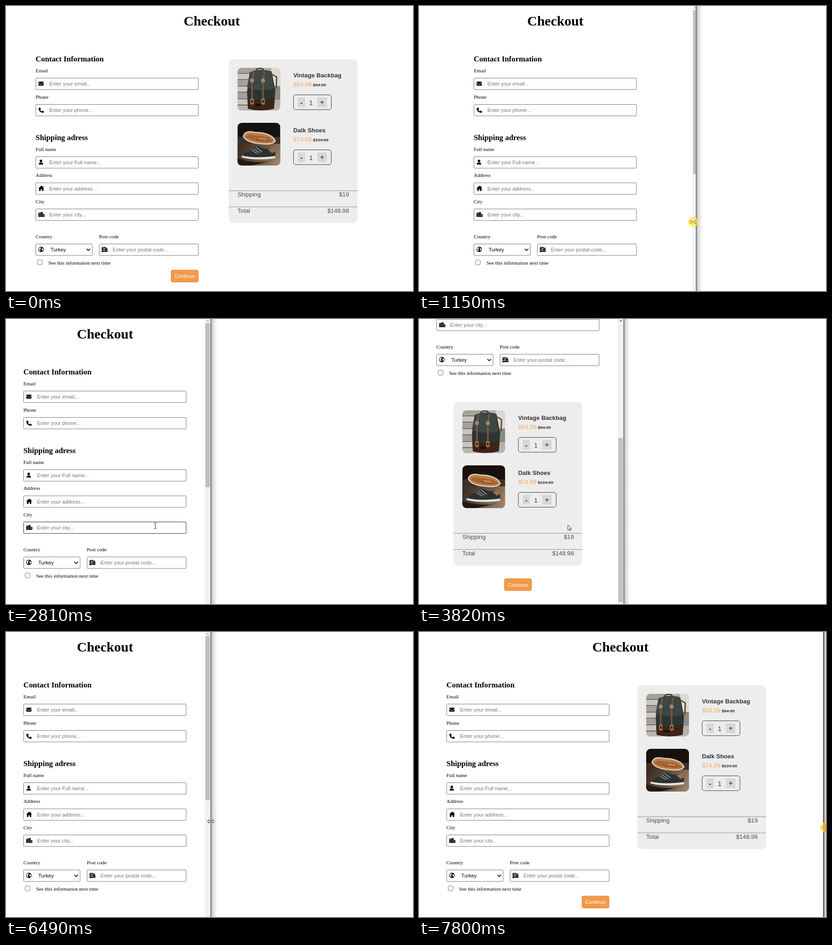
Recreate the animation shown at these times as an HTML page with a canvas. Size 894 px wide and 627 px high, loop 8 s.

```html
<!DOCTYPE html>
<html lang="en">
<head>
<meta charset="utf-8">
<title>Checkout</title>
<style>
html, body { margin: 0; width: 100%; height: 100%; overflow: hidden; background: #fff; }
canvas { display: block; }
</style>
</head>
<body>
<canvas id="stage" width="894" height="627"></canvas>
<script>
const c = document.getElementById('stage').getContext('2d');
const LOOP = 8000, W = 894, H = 627, FORM = 358, CARD = 282.5, MAX_SCROLL = 446;
const SERIF = '"Liberation Serif", "Times New Roman", serif';
const SANS = '"Liberation Sans", Arial, sans-serif';

// time, window edge, page width
const sizes = [
  [0, 920, 904], [500, 844, 840], [820, 733, 720], [1150, 609, 599], [1480, 517, 506],
  [1810, 498, 482], [2160, 465, 444], [2480, 450, 435], [6820, 651, 637],
  [7140, 790, 768], [7470, 855, 840], [7800, 889, 885]
];
// time, scroll offset
const scrolls = [[0, 0], [3150, 111], [3490, 334], [3820, 446], [4480, 425], [4820, 223], [5170, 45], [5500, 0]];
// time, kind, x, y
const pointers = [
  [0, 'none', 0, 0], [500, 'drag', 842, 472], [820, 'drag', 728, 474], [1150, 'drag', 602, 475],
  [1480, 'drag', 512, 478], [1810, 'drag', 493, 481], [2160, 'drag', 460, 484], [2480, 'drag', 452, 486],
  [2810, 'text', 328, 455], [3150, 'arrow', 326.5, 452.5], [4150, 'arrow', 328.5, 452.5],
  [5500, 'arrow', 349.5, 442], [5830, 'arrow', 446, 417], [6160, 'arrow', 449.5, 417],
  [6490, 'resize', 450, 416.5], [6820, 'drag', 651, 420], [7140, 'drag', 790, 425],
  [7470, 'drag', 855, 428], [7800, 'drag', 892, 430]
];
const at = (list, t) => list.findLast(k => k[0] <= t);

function text(s, x, y, size, color = '#000', font = SANS, weight = '', align = 'left') {
  c.font = `${weight} ${size}px ${font}`;
  c.textAlign = align;
  c.fillStyle = color;
  c.fillText(s, x, y);
}
function rect(x, y, w, h, fill) {
  c.fillStyle = fill;
  c.fillRect(x, y, w, h);
}
function round(x, y, w, h, r, fill, stroke, line = 1) {
  c.beginPath();
  c.roundRect(x, y, w, h, r);
  if (fill) { c.fillStyle = fill; c.fill(); }
  if (stroke) { c.strokeStyle = stroke; c.lineWidth = line; c.stroke(); }
}
function path(d, fill, stroke, line = 1) {
  const p = new Path2D(d);
  if (fill) { c.fillStyle = fill; c.fill(p); }
  if (stroke) { c.strokeStyle = stroke; c.lineWidth = line; c.stroke(p); }
}
function disc(x, y, r, fill) {
  c.beginPath();
  c.arc(x, y, r, 0, 7);
  c.fillStyle = fill;
  c.fill();
}
function place(x, y, draw) {
  c.save();
  c.translate(x, y);
  draw();
  c.restore();
}

const icons = {
  mail() {
    round(-5.7, -4.3, 11.4, 8.7, 1.4, '#000');
    path('M-6 -2L-.9 1.5Q0 2 .9 1.5L6 -2', null, '#fff', 1);
  },
  phone() {
    path('M-5 -4.6L-2.6 -5.3Q-2 -5.4 -1.7 -4.8L-.6 -2.3Q-.4 -1.8 -.8 -1.4L-2 -.4Q-.8 2 1.4 3' +
      'L2.5 1.6Q2.9 1.2 3.4 1.4L5.8 2.4Q6.4 2.7 6.2 3.3L5.6 5.6Q5.4 6.1 4.8 6.1Q-5.5 5.3 -5.6 -4Q-5.5 -4.5 -5 -4.6Z', '#000');
  },
  user() {
    disc(-.3, -2.9, 2.8, '#000');
    path('M-5.2 5Q-5.2 .8 -1.4 .8H.8Q4.6 .8 4.6 5Z', '#000');
  },
  house() {
    path('M.5 -6L7 0H5.2V5.6H2V2H-1V5.6H-4.2V0H-6L.5 -6ZM3 -5H4.8V-2H3Z', '#000');
  },
  city() {
    path('M-6 -3H-4.5V-5H-3.4V-3H-2V-5H-.8V-3H-.2V-5.4H4V-1H7.7V5H-6Z', '#000');
    for (let i = 0; i < 5; i++) rect(-4.8 + i * 2.5, i > 3 ? .6 : -1.8, 1.1, 1.3, '#fff');
    for (let i = 0; i < 5; i++) rect(-4.8 + i * 2.5, 1.4, 1.1, 1.4, '#fff');
  },
  globe() {
    disc(0, -.4, 5.8, '#000');
    path('M-4.5 -2.4Q-3 -5 -.8 -4.8L.2 -3.4L-1.4 -1.6L-2.8 -.6L-1 1L-1.6 3.8Q-3.4 2.6 -4.6 .4Z' +
      'M2.6 -3.6L4.6 -1.4L4.4 1.4L2.8 2.8L1.2 .4L1.6 -1.6Z', '#fff');
  },
  bulk() {
    path('M-6 -5.5H2.4V-2.6H-1.5V1H-6Z', '#000');
    path('M-5 -3.5H0', null, '#fff', .9);
    rect(-6.3, 2, 5.5, 3.4, '#000');
    round(-.3, -1.7, 7.2, 6.6, .8, '#000');
    path('M-.3 .4L3.3 2.5L7 .4', null, '#fff', .9);
    rect(3, -4.2, 3, 2, '#000');
  }
};

function field(x, y, w, icon, hint, border = '#767676') {
  round(x + .5, y + .5, w - 1, 25.3, 1.8, '#fff', border);
  place(x + 12, y + 12.8, icons[icon]);
  text(hint, x + 30, y + 17.2, 11.28, '#757575');
}
const label = (s, x, y) => text(s, x, y, 11.28, '#000', SERIF);
const heading = (s, x, y) => text(s, x, y, 16.9, '#000', SERIF, 'bold');

function drawForm(x, hover) {
  heading('Contact Information', x, 122);
  label('Email', x, 146);
  field(x, 158, FORM, 'mail', 'Enter your email...');
  label('Phone', x, 203.5);
  field(x, 216, FORM, 'phone', 'Enter your phone...');
  heading('Shipping adress', x, 294.5);
  label('Full name', x, 318.5);
  field(x, 331, FORM, 'user', 'Enter your Full name...');
  label('Address', x, 376);
  field(x, 388.5, FORM, 'house', 'Enter your address...');
  label('City', x, 434);
  field(x, 446, FORM, 'city', 'Enter your city...', hover ? '#2c2c2c' : undefined);
  label('Country', x, 510.5);
  field(x, 523, 125, 'globe', '');
  text('Turkey', x + 32.7, 540, 11.28);
  path(`M${x + 112} 534L${x + 116} 538L${x + 120} 534`, null, '#000', 1.7);
  label('Post code', x + 139.3, 510.5);
  field(x + 139.3, 523, FORM - 139.3, 'bulk', 'Enter your postal code...');
  round(x + 4, 558.8, 10.5, 10.5, 2, '#fff', '#767676');
  label('See this information next time', x + 28, 568.5);
}

function bagPhoto() {
  rect(0, 0, 94, 94, '#b5b0a9');
  for (let i = 0; i < 7; i++) {
    rect(0, i * 14, 40, 10, i % 2 ? '#c9c6c1' : '#a5a099');
    rect(0, i * 14 + 11, 40, 2, '#756f69');
  }
  rect(74, 0, 20, 44, '#d9d8d4');
  rect(78, 40, 16, 30, '#8a8983');
  rect(0, 84, 94, 10, '#b9b6b0');
  path('M40 8Q40 1 50 1Q58 1 58 9', null, '#46301f', 2.5);
  path('M27 10Q50 0 75 8L83 50L80 90Q50 97 23 90L21 52Z', '#2b3434');
  path('M27 10Q50 1 74 8L79 46Q52 54 21 43Z', '#3c4746');
  path('M22 68Q50 74 82 67L80 90Q50 97 23 90Z', '#3e2417');
  path('M36 9L32 28V82M59 9L56 28V82', null, '#815536', 3.4);
  path('M75 14L86 20L85 46', null, '#6f4328', 3);
  for (const x of [32, 56]) {
    disc(x, 28, 4.5, '#a18870');
    rect(x - 4, 68, 8, 12, '#9a7656');
    rect(x - 2, 71, 4, 6, '#3e2417');
  }
  rect(39, 79, 13, 6, '#20130d');
}

function shoePhoto() {
  rect(0, 0, 94, 94, '#17110d');
  const g = c.createLinearGradient(0, 44, 94, 94);
  g.addColorStop(0, '#352920');
  g.addColorStop(.55, '#685545');
  g.addColorStop(1, '#a68b6c');
  rect(0, 46, 94, 48, g);
  rect(0, 31, 94, 15, '#3e3028');
  path('M0 78Q40 92 78 83L30 94H0Z', '#211914');
  path('M13 30Q16 16 38 21Q76 22 83 40Q77 49 52 46Q20 44 13 30Z', '#bd7e48', '#e0d2c0', 2.5);
  path('M18 31Q24 23 40 28L70 34Q79 38 76 42Q40 44 18 31Z', '#a46434');
  path('M46 30L67 33L64 40L43 37Z', '#bd7e48', '#7d4926', 1.4);
  path('M10 72Q18 61 34 61L44 51L58 57L80 56Q85 65 82 76Q40 82 10 72Z', '#293134');
  path('M66 58L80 55L83 62L76 67Z', '#a96a3c');
  path('M10 72Q38 79 83 73V78Q38 84 9 76Z', '#e6e1d9');
  path('M32 61L44 68M36 58L49 66M41 54L54 64', null, '#c9c6c0', 1.1);
}

function photo(x, y, draw) {
  place(x, y, () => {
    c.beginPath();
    c.roundRect(0, 0, 94, 94, 9.5);
    c.clip();
    draw();
  });
}

function item(x, y, draw, name, price, old) {
  photo(x + 19, y + 19, draw);
  const l = x + 141.5;
  text(name, l, y + 40, 13.16, '#333', SANS, 'bold');
  text(price, l, y + 60.3, 13.16, '#f6a85f');
  text(old, l + 43.3, y + 60, 9.4, '#333');
  rect(l + 43.3, y + 56.2, c.measureText(old).width, 1, '#333');
  round(l + .5, y + 78.5, 83, 32.5, 4.5, null, '#333');
  rect(l + 10, y + 84, 16, 21.5, '#d8d8d8');
  rect(l + 53, y + 84, 20.5, 21.5, '#d8d8d8');
  text('-', l + 18, y + 100.5, 15, '#222', SANS, 'bold', 'center');
  text('1', l + 39, y + 101, 15, '#444', SANS, '', 'center');
  text('+', l + 63.2, y + 100, 16, '#222', SANS, '', 'center');
}

function sumRow(x, y, name, value) {
  rect(x, y, CARD, 1, '#8a8a8a');
  text(name, x + 19, y + 13, 13.16, '#4c4c4c');
  text(value, x + CARD - 18.5, y + 13, 13.16, '#4c4c4c', SANS, '', 'right');
}

function drawCard(x, y) {
  round(x, y, CARD, 360.5, 10, '#ededed');
  item(x, y, bagPhoto, 'Vintage Backbag', '$54.99', '$94.99');
  item(x, y + 121, shoePhoto, 'Dalk Shoes', '$74.99', '$124.99');
  sumRow(x, y + 289, 'Shipping', '$19');
  sumRow(x, y + 324.5, 'Total', '$148.98');
}

function drawButton(x, y) {
  round(x, y, 61, 27.7, 4.5, '#f2994a');
  text('Continue', x + 30.5, y + 18, 11.28, '#fff', SANS, '', 'center');
}

function drawBar(x, edge, scroll) {
  rect(x, 0, edge - x, H, '#f1f1f1');
  rect(x + 1, 9 + scroll / MAX_SCROLL * 253, 10, 361, '#c1c1c1');
  path(`M${x + 3.5} 5.2L${x + 6.3} 2L${x + 9} 5.2Z`, scroll ? '#505050' : '#a3a3a3');
}

function drawEdge(edge) {
  const g = c.createLinearGradient(edge, 0, edge + 14, 0);
  g.addColorStop(0, 'rgba(0,0,0,.34)');
  g.addColorStop(.35, 'rgba(0,0,0,.13)');
  g.addColorStop(1, 'rgba(0,0,0,0)');
  rect(edge, 0, 14, H, g);
  rect(edge - 1, 0, 1.6, H, edge > 880 ? '#222' : '#6c6c6c');
}

function drawPointer(kind, x, y) {
  place(x, y, () => {
    if (kind === 'drag') disc(0, 0, 11, 'rgba(255,236,60,.72)');
    if (kind === 'drag' && x > 880) {
      c.beginPath();
      c.rect(-3, -11, 14, 22);
      c.clip();
      disc(0, 0, 11, '#f5a646');
    }
  });
  place(x, y, () => {
    if (kind === 'drag' || kind === 'resize') {
      path('M-8.3 0L-4.3 -4V-1.4H4.3V-4L8.3 0L4.3 4V1.4H-4.3V4Z',
        kind === 'drag' ? '#fff3a0' : '#fff', kind === 'drag' ? '#a3741c' : '#222', 1);
    } else if (kind === 'text') {
      path('M-2.8 -6H-.7L0 -5.3L.7 -6H2.8M0 -5.3V5.3M-2.8 6H-.7L0 5.3L.7 6H2.8', null, '#444', 1.1);
    } else if (kind === 'arrow') {
      path('M.5 .5V12L3.2 9.6L5 13.6L6.9 12.7L5.1 8.9H8.6Z', '#fff', '#222', 1);
    }
  });
}

function draw(t) {
  const [, edge, width] = at(sizes, t);
  const scroll = at(scrolls, t)[1];
  const [, kind, px, py] = at(pointers, t);
  const wide = width > 750, mid = width / 2;
  const left = wide ? width / 4 - 161 : mid - 179.3;

  rect(0, 0, W, H, '#fff');
  c.save();
  c.beginPath();
  c.rect(0, 0, edge, H);
  c.clip();
  place(0, -scroll, () => {
    text('Checkout', mid, 43, 30.08, '#000', SERIF, 'bold', 'center');
    drawForm(left, kind === 'text');
    drawCard(wide ? mid + 37.5 : mid - CARD / 2, wide ? 117 : 628);
    drawButton(wide ? left + FORM - 61 : mid - 30.5, wide ? 580.3 : 1016.6);
  });
  if (!wide) drawBar(width + 2, edge, scroll);
  c.restore();
  drawEdge(edge);
  drawPointer(kind, px, py);
}

const start = performance.now();
function tick() {
  draw((performance.now() - start) % LOOP);
  requestAnimationFrame(tick);
}
tick();
</script>
</body>
</html>
```
